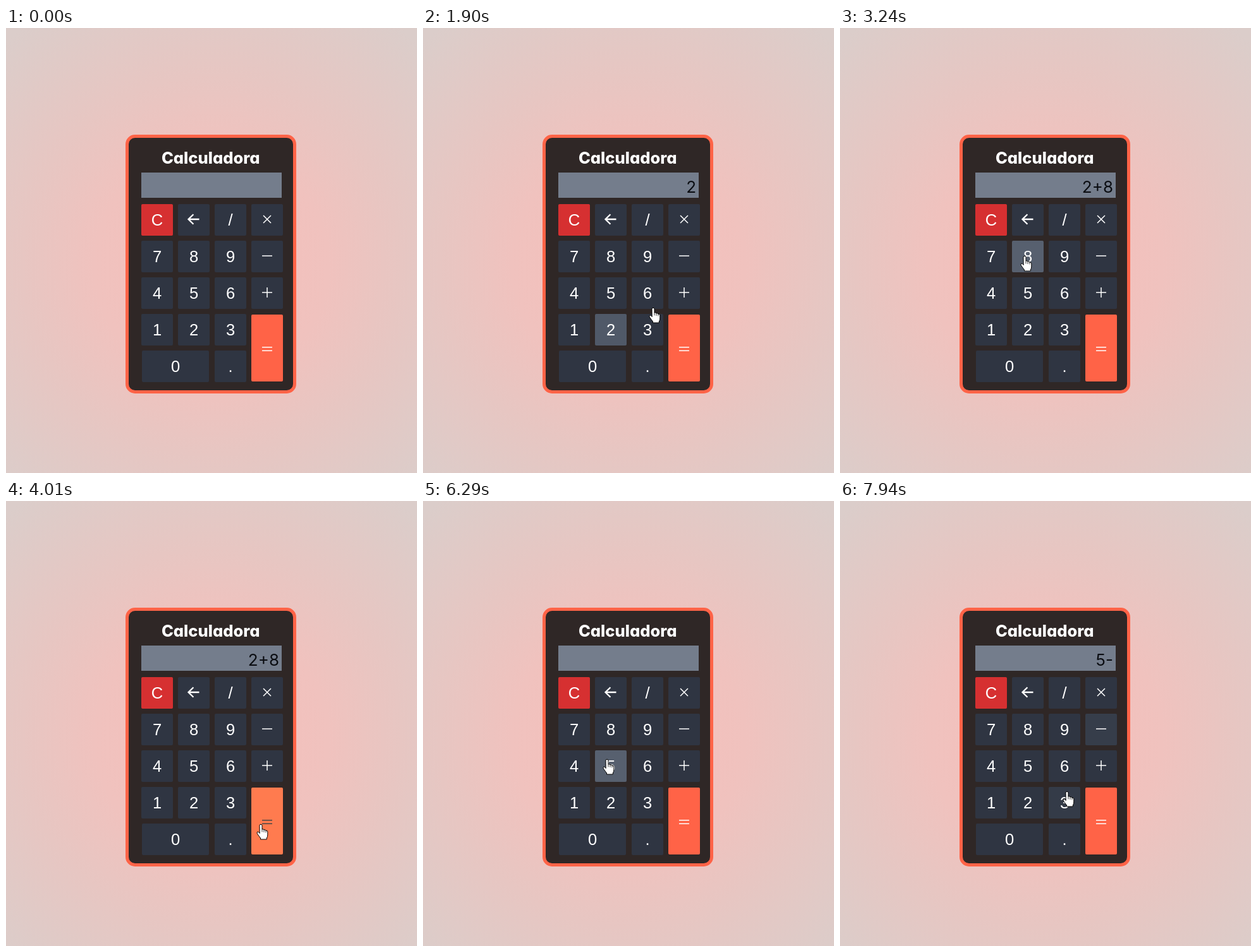
Recreate the animation shown at these times as an HTML page. Size 650 px wide and 705 px high, loop 8 s.

```html
<!DOCTYPE html>
<html lang="es">
<head>
<meta charset="utf-8">
<title>Calculadora</title>
<style>
  html, body { margin: 0; width: 100%; height: 100%; overflow: hidden; }
  body { background: radial-gradient(circle at 325px 375px, #f6bfbb 0, #f0c2be 185px, #e7c6c2 300px, #dbcdca 480px); }
  svg { display: block; width: 650px; height: 705px; }
  text { text-anchor: middle; }
  .title { font: 800 25.5px Inter, sans-serif; font-feature-settings: "cv11"; fill: #fff; }
  .display { font: 26px Inter, sans-serif; text-anchor: end; fill: #0b0d12; }
  .key text { font: 25.6px "Liberation Sans", Arial, sans-serif; fill: currentColor; }
  .key path { fill: none; stroke: currentColor; }
</style>
</head>
<body>
<svg viewBox="0 0 650 705">
  <rect x="191.5" y="171.5" width="265" height="405" rx="12.5" fill="#2f2726" stroke="#ff6347" stroke-width="5"/>
  <text class="title" x="323.7" y="215">Calculadora</text>
  <rect x="214" y="229" width="222" height="40" fill="#747d8c"/>
  <text class="display" id="display" x="432" y="261"></text>
  <g id="keys"></g>
  <g id="hand" fill="#fff" stroke="#000" stroke-linejoin="round" stroke-linecap="round">
    <path d="M-2 2Q-2 .3 0 .3Q2 .3 2 2V8Q4.4 7.2 5 9Q7.4 8.2 8 10.2Q10.8 9.6 10.8 12V17Q10.8 20 9.3 22V24H-.5V22Q-2.5 19.5-5.3 15.6Q-6.7 13.2-5.3 12.2Q-3.8 11.5-2 14.2Z"/>
    <path d="M2 8V12M5 9V12.5M8 10.2V13" fill="none" stroke-width=".8"/>
  </g>
</svg>
<script>
const LOOP = 8000, STEP = 69.25, FADE = 500, TICK = 10;

const PATH = [ // time, x, y
  [400, 554, 658], [960, 285, 469],
  [1720, 285, 469], [2060, 407, 428],
  [2560, 407, 428], [2860, 292, 361],
  [3410, 292, 361], [3800, 403, 512],
  [4520, 403, 512], [4930, 241, 305],
  [5400, 241, 305], [5800, 291, 409],
  [6640, 291, 409], [7050, 410, 357],
  [7540, 410, 357], [7950, 359, 460]
];
const TEXTS = [[0, ""], [1430, "2"], [2400, "2+"], [3170, "2+8"], [4150, "10"],
               [5250, ""], [6490, "5"], [7320, "5-"]];

const NUM = { base: [47, 53, 66], hover: [87, 96, 111], ink: 255 };
const CLEAR = { base: [214, 48, 49], hover: [255, 71, 87], ink: 0 };
const EQUAL = { base: [255, 99, 71], hover: [255, 127, 80], ink: 40 };

const ICONS = {
  back: ["M-8.5 0H8.5M-.6-7.7L-8.5 0L-.6 7.7", 2.3],
  times: ["M-6-6L6 6M6-6L-6 6", 1.5],
  minus: ["M-8 0H8", 1.5],
  plus: ["M-8 0H8M0-8V8", 1.5],
  equal: ["M-8-2.7H8M-8 2.7H8", 1.4]
};

const svg = (tag, attrs, parent) => {
  const el = document.createElementNS("http://www.w3.org/2000/svg", tag);
  for (const name in attrs) el.setAttribute(name, attrs[name]);
  return parent.appendChild(el);
};
const mix = (a, b, p) => a + (b - a) * p;
const last = (list, t) => list.filter(row => row[0] <= t).pop();
const smooth = p => p * p * (3 - 2 * p);

const keys = [];
function addKey(label, x, y, w = 50, h = 50, look = NUM) {
  const g = svg("g", { class: "key" }, document.getElementById("keys"));
  const box = svg("rect", { x, y, width: w, height: h, rx: 2 }, g);
  const cx = x + w / 2, cy = y + h / 2;
  const icon = ICONS[label];
  if (icon) {
    const dy = label === "equal" ? 1.8 : -1;
    svg("path", { d: icon[0], "stroke-width": icon[1], transform: `translate(${cx} ${cy + dy})` }, g);
  } else {
    svg("text", { x: cx, y: cy + 8.7 }, g).textContent = label;
  }
  keys.push({ g, box, x, y, w, h, look, levels: [] });
  return g;
}
const ROWS = [["C", "back", "/", "times"], ["7", "8", "9", "minus"], ["4", "5", "6", "plus"], ["1", "2", "3"]];
ROWS.forEach((row, r) => row.forEach((label, c) =>
  addKey(label, 214 + 58 * c, 279 + 58 * r, 50, 50, label === "C" ? CLEAR : NUM)));
addKey("0", 215, 511, 106);
addKey(".", 330, 511);
const equalKey = addKey("equal", 388, 454, 50, 106, EQUAL);
equalKey.lastChild.setAttribute("transform", "translate(413 508.5)");

function pointer(t) {
  const i = PATH.findIndex(p => p[0] > t);
  if (i === 0) return null;
  if (i < 0) return PATH[PATH.length - 1].slice(1);
  const [t0, x0, y0] = PATH[i - 1], [t1, x1, y1] = PATH[i];
  const p = (t - t0) / (t1 - t0);
  const e = i === 1 ? 1 - (1 - p) ** 2 : smooth(p);
  return [mix(x0, x1, e), mix(y0, y1, e)];
}

// The CSS "ease" curve
function ease(p) {
  if (p >= 1) return 1;
  let lo = 0, hi = 1, s = p;
  for (let i = 0; i < 16; i++) {
    s = (lo + hi) / 2;
    const x = 0.75 * s * (1 - s) ** 2 + 0.75 * s * s * (1 - s) + s ** 3;
    if (x < p) lo = s; else hi = s;
  }
  return 0.3 * s * (1 - s) ** 2 + 3 * s * s * (1 - s) + s ** 3;
}

// Hover level of each key over the whole loop, with reversible fades
for (const key of keys) {
  let from = 0, to = 0, start = 0, span = FADE, level = 0;
  for (let t = 0; t <= LOOP; t += TICK) {
    level = mix(from, to, ease((t - start) / span));
    const at = pointer(t);
    const over = at && at[0] >= key.x && at[0] < key.x + key.w &&
                 at[1] >= key.y && at[1] < key.y + key.h ? 1 : 0;
    if (over !== to) {
      from = level; to = over; start = t;
      span = FADE * Math.max(0.02, Math.abs(to - from));
    }
    key.levels.push(level);
  }
}

const hand = document.getElementById("hand");
const display = document.getElementById("display");

function draw(now) {
  const time = now % LOOP;
  const n = Math.floor((time - 375) / STEP);
  const t = Math.min(LOOP - 1, Math.max(0, 400 + n * STEP));
  const at = time < 400 ? null : pointer(Math.max(400, t));

  hand.style.display = at ? "" : "none";
  if (at) hand.setAttribute("transform", `translate(${Math.round(at[0])} ${Math.round(at[1])})`);
  display.textContent = last(TEXTS, t)[1];

  for (const { g, box, look, levels } of keys) {
    const p = levels[Math.round(t / TICK)];
    const ink = Math.round(mix(255, look.ink, p));
    box.setAttribute("fill", `rgb(${look.base.map((c, i) => Math.round(mix(c, look.hover[i], p)))})`);
    g.style.color = `rgb(${ink},${ink},${ink})`;
  }
}

let origin;
function frame(now) {
  origin ??= now;
  draw(now - origin);
  requestAnimationFrame(frame);
}
draw(0);
requestAnimationFrame(frame);
</script>
</body>
</html>
```
